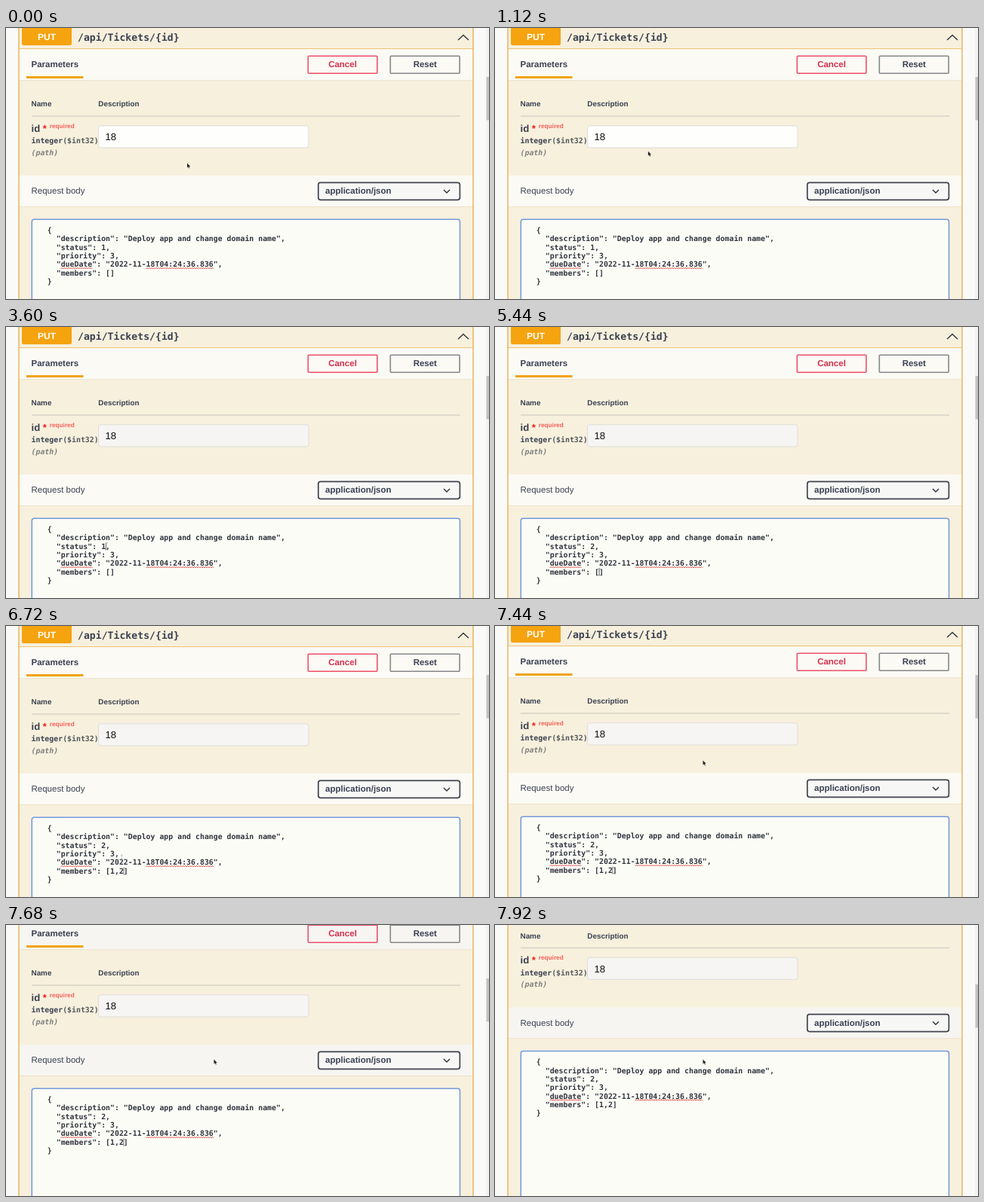
These frames come from a looping animation (640 by 360 pixels, 8 s). An HTML page:

```html
<!DOCTYPE html>
<html lang="en">
<head>
<meta charset="utf-8">
<title>API request editor</title>
<style>
  html, body { margin: 0; width: 100%; height: 100%; overflow: hidden; background: #fafaf9; }
  svg { display: block; width: 640px; height: 360px; }
  text {
    font: 11.5px "Liberation Sans", Arial, sans-serif;
    fill: #3b4151;
    text-rendering: geometricPrecision;
    white-space: pre;
  }
  .b { font-weight: 700; }
  .mid { text-anchor: middle; }
  .small { font-size: 9.88px; }
  .big { font-size: 13.17px; }
  .mono { font-family: "DejaVu Sans Mono", monospace; font-weight: 700; }
  .line { fill: none; stroke: #333840; stroke-width: 1.5; }
  .band { fill: #fbfaf5; }
  .scrolled .band { fill: #f6f5f2; }
  #code text { fill: #30353f; }
</style>
</head>
<body>
<svg viewBox="0 0 640 360">
  <rect x="17" width="602" height="360" fill="#f7f0dd"/>

  <g id="page">
    <rect x="21" y="-2" width="66" height="25" rx="2.5" fill="#f5a30f"/>
    <text class="b mid" x="54" y="16" style="font-size:12px;fill:#fff">PUT</text>
    <text class="mono big" x="95" y="16.5">/api/Tickets/{id}</text>
    <path class="line" d="M599 16l7-6.5 7 6.5"/>

    <rect class="band" x="17" y="28" width="602" height="41.5"/>
    <path d="M17 27.5h602" stroke="#efc274"/>
    <path d="M17 69.8h602" stroke="#ebe3cf"/>
    <text class="b" x="33.5" y="52">Parameters</text>
    <rect x="27" y="64" width="75.5" height="3" fill="#f0a30f"/>
    <rect x="400.3" y="37.3" width="91.6" height="23" rx="1" fill="none" stroke="#ee4f68" stroke-width="1.6"/>
    <text class="b mid" x="446" y="52.2" style="fill:#d42f4d">Cancel</text>
    <rect x="509.3" y="37.3" width="91.8" height="23" rx="1" fill="none" stroke="#85878a" stroke-width="1.6"/>
    <text class="b mid" x="555.3" y="52.2">Reset</text>

    <text class="b small" x="33.5" y="104.3">Name</text>
    <text class="b small" x="122.3" y="104.3">Description</text>
    <path d="M34 117h568" stroke="#c9c5bb"/>
    <text class="b big" x="33.5" y="138">id <tspan fill="#f02020">*</tspan></text>
    <text class="b" x="57.8" y="132.8" style="font-size:8.23px;fill:#f4605a">required</text>
    <text class="mono small" x="33.5" y="153.3">integer<tspan fill="#55585c">($int32)</tspan></text>
    <text class="mono small" x="33.5" y="168.8" style="font-style:italic;fill:#808080">(path)</text>
    <rect id="idBox" x="122.5" y="129.8" width="278.5" height="29.2" rx="3"/>
    <text class="big" x="131.5" y="149.3" style="fill:#111">18</text>

    <rect class="band" x="17" y="196" width="602" height="41"/>
    <path d="M17 237.5h602" stroke="#efe2c6"/>
    <text x="33.5" y="220.3">Request body</text>
    <rect x="413.8" y="205.3" width="187.6" height="23" rx="3" fill="#f7f7f6" stroke="#41444e" stroke-width="1.7"/>
    <text class="b" x="423" y="220.3">application/json</text>
    <path class="line" d="M580 215l4 4 4-4"/>

    <rect id="area" x="34.3" y="254.3" width="567.2" height="400" rx="3" stroke-width="1.5"/>
    <g id="code"></g>
    <path id="caret" d="M0-8v10" stroke="#555" stroke-width=".8"/>
  </g>

  <path d="M17 0v360M619 0v360" stroke="#eab75c" stroke-width="1.5"/>
  <rect x="636" width="4" height="360" fill="#f2f2f1"/>
  <rect id="thumb" x="636.5" y="65" width="3.5" height="57.5" fill="#c2c2c1"/>

  <path id="arrow" d="M0 0v6l1.4-1.2 1 2.1 1-.5-1-2h1.9z" fill="#222" stroke="#fff" stroke-width=".5" paint-order="stroke"/>
  <path id="beam" d="M-1.5-4.5h3M0-4.5v9M-1.5 4.5h3" fill="none" stroke="#777" stroke-width=".7" opacity=".55"/>
</svg>

<script>
  const LOOP = 8000, STEP = 80;
  const CHAR = 5.95, ROW = 11.33, LEFT = 54.8, TOP = 272;
  const $ = id => document.getElementById(id);
  const set = (el, attrs) => {
    for (const k in attrs) el.setAttribute(k, attrs[k]);
    return el;
  };
  const add = (parent, tag, attrs) =>
    parent.appendChild(set(document.createElementNS("http://www.w3.org/2000/svg", tag), attrs));
  const show = (el, on) => set(el, { visibility: on ? "visible" : "hidden" });

  const rows = [
    '{',
    '  "description": "Deploy app and change domain name",',
    '  "status": 1,',
    '  "priority": 3,',
    '  "dueDate": "2022-11-18T04:24:36.836",',
    '  "members": []',
    '}'
  ].map((str, i) => {
    const el = add($("code"), "text", { class: "mono small", x: LEFT, y: TOP + i * ROW });
    el.textContent = str;
    return el;
  });

  // Spelling marks under a run of characters in the date row
  function squiggle(from, count) {
    let d = `M${LEFT + from * CHAR} ${TOP + 4 * ROW + 2.6}`;
    for (let i = 0; i < count * 2; i++) d += `l${CHAR / 4} -1.5l${CHAR / 4} 1.5`;
    add($("code"), "path", { d, fill: "none", stroke: "#e2463f", "stroke-width": 1 });
  }
  squiggle(3, 7);
  squiggle(22, 15);

  // [time, x, y]
  const mouse = [
    [0, 240, 179.5], [800, 240, 179.5], [1360, 175, 152], [1600, 175, 152],
    [1920, 118, 146.5], [2400, 118, 146.5], [2720, 213, 231], [2960, 195, 257],
    [3360, 133.5, 291], [4960, 133.5, 291], [5280, 138, 325], [6640, 138, 325],
    [7360, 275.5, 178.5], [8000, 275.5, 178.5]
  ];
  // [time, offset]
  const scroll = [[0, 0], [7360, 0], [7440, 1], [7520, 12], [7680, 37], [7920, 86.7], [8000, 102]];

  function at(track, t, col = 1) {
    const i = track.findIndex(k => k[0] > t);
    const a = track[i - 1], b = track[i];
    return a[col] + (b[col] - a[col]) * (t - a[0]) / (b[0] - a[0]);
  }

  function draw(t) {
    const s = at(scroll, t);
    const idFocus = t >= 1360 && t < 3040;
    set($("page"), { transform: `translate(0 ${-s})`, class: s > 5 ? "scrolled" : "" });
    set($("thumb"), { y: 65 + s * 0.16 });

    set($("idBox"), {
      fill: t < 1360 ? "#fefefc" : "#f6f5f3",
      stroke: idFocus ? "#202020" : "#dddcd7",
      "stroke-width": idFocus ? 1.7 : 1
    });
    set($("area"), { fill: "#fcfcf6", stroke: idFocus ? "none" : "#7299dd" });
    set($("code"), { transform: idFocus ? "translate(-1.7 -1.7)" : "" });

    const status = t < 4320 ? "1" : t < 4480 ? "" : "2";
    const members = "1,2".slice(0, (t >= 5680) + (t >= 5920) + (t >= 6320));
    rows[2].textContent = `  "status": ${status},`;
    rows[5].textContent = `  "members": [${members}]`;

    const inMembers = t >= 5280;
    const row = inMembers ? 5 : 2;
    const col = inMembers ? 14 + members.length : 12 + status.length;
    set($("caret"), { transform: `translate(${LEFT + col * CHAR} ${TOP + row * ROW})` });
    show($("caret"), t >= 3360 && (t - 240) % 1000 < 500);

    const pos = { transform: `translate(${at(mouse, t)} ${at(mouse, t, 2)})` };
    const beam = t >= 1200 && t < 2560 || t >= 2880 && t < 7040;
    show(set($("arrow"), pos), !beam);
    show(set($("beam"), pos), beam);
  }

  const start = performance.now();
  function tick() {
    const t = (performance.now() - start) % LOOP;
    draw(Math.floor(t / STEP) * STEP);
    requestAnimationFrame(tick);
  }
  tick();
</script>
</body>
</html>
```
